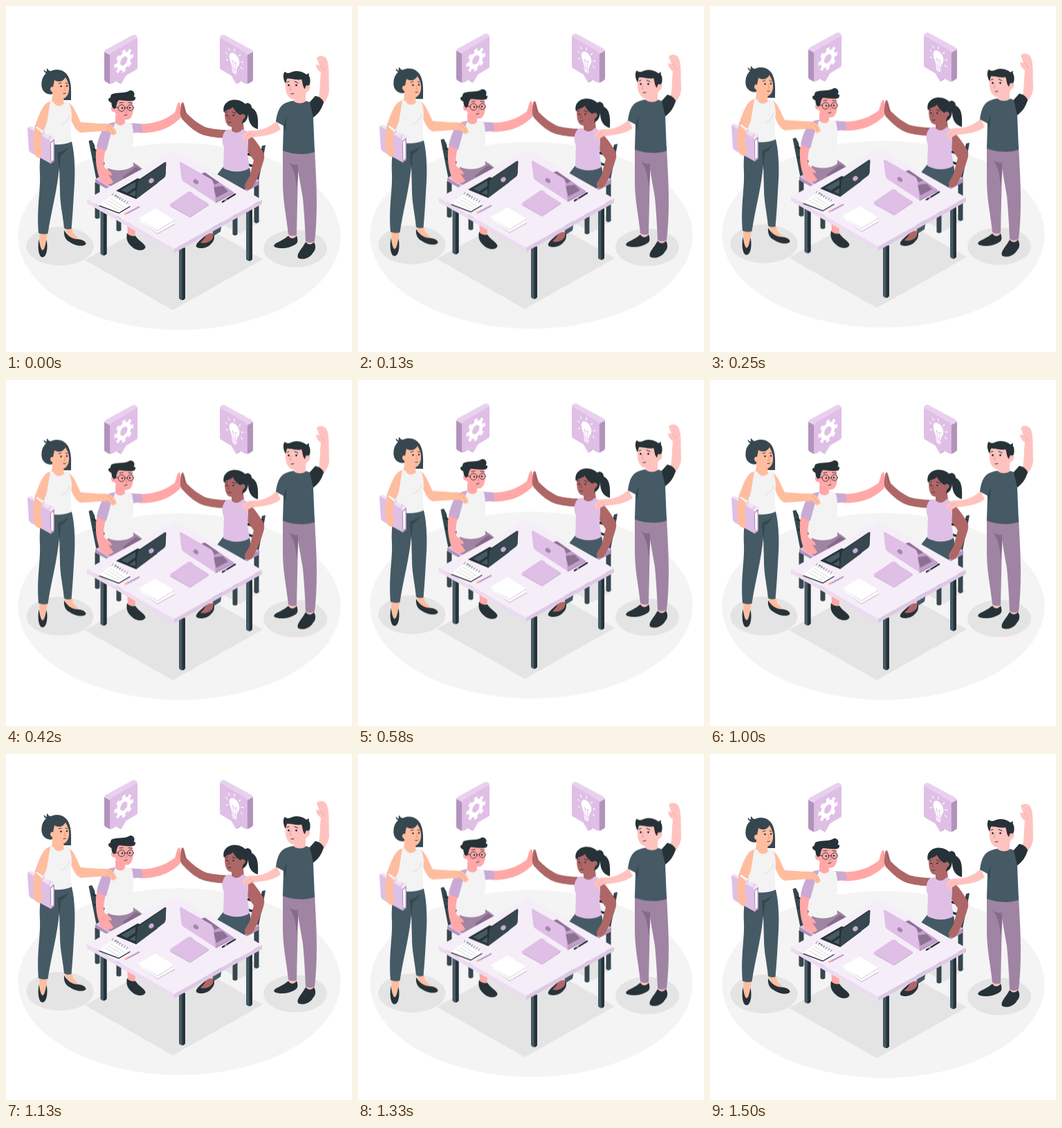
An HTML page for the animation above (1540 ms loop, 500 by 500 pixels).

```html
<!DOCTYPE html>
<html lang="en">
<head>
<meta charset="utf-8">
<title>Team high five</title>
<style>
  html, body { margin: 0; width: 100%; height: 100%; overflow: hidden; background: #fff; }
  svg { display: block; width: 100%; height: 100%; }
  .scene { animation: float 1540ms linear infinite; }
  @keyframes float {
    0%, 97.4%, 100% { transform: translateY(0); }
    46.75% { transform: translateY(-9.6px); }
    95.45% { transform: translateY(.4px); }
  }
  .ink { fill: #263238; }
  .slate { fill: #37474f; }
  .denim { fill: #455a64; }
  .lilac { fill: #dfbfe6; }
  .mauve { fill: #b392bb; }
  .plum { fill: #a084a3; }
  .cloth { fill: #f3f3f3; }
  .peach { fill: #ffbd9f; }
  .rose { fill: #ffa8a7; }
  .blush { fill: #ffc3bf; }
  .brown { fill: #ae6766; }
  .white { fill: #fff; }
  .shade { fill: #e4e4e4; }
  .line { fill: none; stroke: #263238; stroke-linecap: round; stroke-linejoin: round; }
  .pale { fill: none; stroke: #fff; stroke-linecap: round; }
</style>
</head>
<body>
<svg viewBox="0 0 500 500">
<defs>
  <g id="bubble">
    <path fill="#e8d0ee" d="M142 67Q142 64.500 144.500 63L183 42Q185 41 187 42.200L188.500 43Q190 44 190 46V89L151 112L143.500 109Q142 108 142 106Z"/>
    <path class="mauve" d="M142 66.500L150.500 71V112.500Q149 112.500 148 111.800L143.500 109Q142 108 142 106ZM158 105L162 110.300L166.500 112.500V104Z"/>
    <path class="lilac" d="M150.500 71.500Q150.500 69 153 67.500L187 47.500Q190 46 190 48.500V89Q190 91 188 92L173.500 100.500L166.500 112.500L161 108L153.500 112Q150.500 113.500 150.500 110.500Z"/>
  </g>
  <g id="leg">
    <path class="denim" d="M0 0H9V73Q4.500 78 0 73Z"/>
    <path class="ink" d="M4.500 0H9V73Q7 75.500 4.500 75.500Z"/>
  </g>
</defs>
<g class="scene">
  <!-- floor -->
  <ellipse cx="250.500" cy="333" rx="233" ry="135" fill="#f4f4f4"/>
  <g class="shade">
    <path d="M241 439.500L114 367L245 295L371 366Z"/>
    <path d="M338 329L302 309L334 291L369 311Z"/>
    <ellipse cx="78" cy="347" rx="48.500" ry="28"/>
    <ellipse cx="418" cy="350.500" rx="46" ry="27"/>
  </g>

  <!-- bubbles -->
  <use href="#bubble"/>
  <g class="pale" transform="matrix(.866 -.5 0 1 170.300 79.500)" style="stroke-linecap:butt">
    <circle r="9" stroke-width="6"/>
    <circle r="13.300" stroke-width="5" pathLength="16" stroke-dasharray="1 1" stroke-dashoffset=".5"/>
  </g>
  <use href="#bubble" transform="matrix(-1 0 0 1 499 0)"/>
  <g transform="matrix(.866 .5 0 1 330 79)">
    <path class="white" d="M-4 12C-4 6-8.500 4-8.500-2A8.500 8.500 0 0 1 8.500-2C8.500 4 4 6 4 12Z"/>
    <path class="pale" stroke-width="2" d="M-3.500 14.500H3.500M-2.500 17.500H2.500"/>
    <path class="pale" stroke-width="1.400" d="M0-13.500V-17M-8-11L-10-13.500M8-11L10-13.500M-11.500-4L-14.500-5M11.500-4L14.500-5M-11 4L-13.500 5.500M11 4L13.500 5.500"/>
    <path fill="none" stroke="#dfbfe6" stroke-width=".9" d="M-1.500 11L-3 1L0 3.500L3 1L1.500 11"/>
  </g>

  <!-- left chair -->
  <path class="slate" d="M119.500 195L124 193.500L128 201L137 252L131 253ZM128.500 255H135.500V306Q132 309 128.500 306ZM159.500 300H166.500V324Q163 327 159.500 324Z"/>
  <path class="line" stroke-width="3" d="M126 207L140 214M128 222L142 228"/>
  <path class="lilac" d="M129 250L160 234L202 256L168 276Z"/>
  <path class="mauve" d="M129 250L168 273V277L129 255Z"/>

  <!-- seated man -->
  <path class="rose" d="M175 310L176 329L186 336L188 315Z"/>
  <path class="ink" d="M175 328C179 333 184 333 187 332C191 339 202 344 201.500 349C199 355 188 354 182 348C176 343 173 337 175 328Z"/>
  <path class="plum" d="M147 231L184 226C192 231 199 236 203 243L168 268L147 258Z"/>
  <path fill="#876b8a" d="M169 247L188 232L195 236L172 255Z"/>
  <path class="rose" d="M192 170.500C212 171 230 165 244 154C246 148 247 141 250 139C252 139 252 142 252 145C255 148 254 157 252 162C238 176 220 184 192 183.500Z"/>
  <path fill="none" stroke="#e98e90" stroke-width=".7" d="M247 155L252 144"/>
  <path fill="#c9aad4" d="M176 169L195 170Q198 177 197 182L180 184Z"/>
  <path class="cloth" d="M156 168C164 166 174 167 182 170Q186 188 183 203L184 231C171 241 151 238 142 231L147 190Z"/>
  <path class="rose" d="M158 157L172 160L172 169Q166 176 158 169Z"/>
  <path fill="#c9aad4" d="M158 168C144 168 137 178 131 203Q137 211 145 209L151 187Z"/>
  <path class="rose" d="M131 204L144 209C141 218 141 226 142 233C148 238 153 240 153 245L148 244L155 254C152 260 143 258 137 253C131 240 128 222 131 204Z"/>
  <path class="rose" d="M156 137C164 131 179 133 183 138C185 149 184 161 177 164C168 166 160 160 157 153Q152 154 152 148Q152 144 156 145Z"/>
  <path class="ink" d="M156 149C154 146 152 144 152.500 140C148 138 147 135 149 133C152 134 150 128 154 127C162 124 172 127 179 122C185 121 187 127 184.500 131Q189 131 186 136C180 139 170 136 163 136C160 139 160 143 159 147Z"/>
  <g class="line" stroke-width=".9">
    <circle cx="167" cy="147.500" r="4.800"/><circle cx="179.800" cy="147" r="4.300"/>
    <path d="M162.200 147L154 146M171.800 147H175.500M164 140L169 139.500M177 139.500L182 140.500M171 158Q173 158 175 157"/>
  </g>
  <circle class="ink" cx="168" cy="147.500" r="1.300"/><circle class="ink" cx="179" cy="147" r="1.300"/>
  <path fill="none" stroke="#e57f80" d="M173 147L175 153L172.500 154"/>

  <!-- right chair -->
  <path class="slate" d="M370 202L375 201L374 207L364 257L358 259ZM358.500 254H365.500V312Q362 316 358.500 312ZM327.500 300H334.500V330Q331 333 327.500 330Z"/>
  <path class="line" stroke="#37474f" stroke-width="3.500" d="M350 214Q363 219 370 208M350 229Q361 235 367 224"/>
  <path class="lilac" d="M296 255L336 236L366 252L331 273Z"/>
  <path class="mauve" d="M331 271L366 252V258L331 277Z"/>

  <!-- seated woman -->
  <path class="denim" d="M298 308H313L310 326L299 333Z"/>
  <path class="ink" d="M289 331C284 336 273 343 275 348C280 352 292 350 297 343C301 339 302 334 300 329Z"/>
  <path class="brown" d="M289 329L300 328L299 335C296 341 288 344 281 342C285 338 289 334 289 329Z"/>
  <path class="denim" d="M315 231L352 234C356 246 349 264 340 270L301 249Z"/>
  <path class="brown" d="M320 179C307 179 295 177 288 175C276 169 268 162 261 155C258 147 258 140 255 139C252 141 253 147 252 151C251 157 253 163 256 165C265 175 276 184 287 187C300 190 312 191 322 191Z"/>
  <path fill="none" stroke="#8c4d50" stroke-width=".7" d="M259 156L256 145"/>
  <path class="ink" d="M345 142C350 138 355 142 355 147C363 151 365 160 364 178C356 176 350 169 350 157Z"/>
  <path class="brown" d="M326 166L342 161L344 180Q335 188 326 181Z"/>
  <path class="brown" d="M341 179C353 183 361 194 371 210C375 216 373 222 370 231C365 245 360 258 354 264C348 267 344 263 345 258L352 246L358 223L347 207Z"/>
  <path class="lilac" d="M318 179L324 178Q333 188 342 178L348 181C352 195 349 207 349 215L352 234C341 242 323 240 314 234L315 204C311 195 312 186 318 179Z"/>
  <path class="brown" d="M317 145C324 138 337 139 342 147C347 151 345 160 340 162C337 171 331 177 323 174C316 171 315 157 317 145Z"/>
  <path class="ink" d="M315 154C312 143 320 135.500 331 135.500C343 136 351 144 350 154C350 162 347 168 341 170C343 163 343 158 339 158C334 155 330 151 328 146C324 150 319 149 315 154Z"/>
  <path class="brown" d="M339 157Q345 154 346 160Q343 166 338 165Z"/>
  <g class="ink"><circle cx="319.500" cy="158" r="1.200"/><circle cx="328.500" cy="158" r="1.200"/></g>
  <path class="line" stroke-width=".9" d="M317 154L320 153M327 153L332 155M321 168Q323 169 325 168"/>
  <path fill="none" stroke="#8c4d50" d="M323 158L321 163H324"/>

  <!-- table -->
  <use href="#leg" x="136.500" y="285"/>
  <use href="#leg" x="347" y="293"/>
  <use href="#leg" x="250" y="349.500"/>
  <path fill="#f5eef8" d="M245 209L370 280L243 351L117 279Z"/>
  <path fill="#ecdcf1" d="M117 279L243 351V357L117 285Z"/>
  <path fill="#dfc8e6" d="M243 351L370 280V286L243 357Z"/>

  <!-- dark laptop -->
  <path class="ink" d="M159 267L190 249L219 256L188 279Z"/>
  <path fill="#455a64" d="M166 266L187 254V262L175 270ZM178 272L187 266V275Z"/>
  <path class="ink" d="M187 277L189 255Q189 253 191 251.500L229 226Q231.500 224.500 231.500 227L230.500 244Q230 247 228 248.500L188 279Z"/>
  <path class="slate" d="M190 254L231 226L230.500 244Q230 247 228 248.500L188 278.500Z"/>
  <ellipse cx="210" cy="252.500" rx="4" ry="3.200" fill="#cdaad6" transform="rotate(-40 210 252.500)"/>

  <!-- lilac laptop -->
  <path fill="#c49ecd" d="M280 243L287 240L329 269L303 283Z"/>
  <path fill="#8d7193" d="M283 242L288 241L308 255L302 258ZM300 262L313 260L321 268L304 277Z"/>
  <path class="mauve" d="M302 283L329 269V271L303 285Z"/>
  <path class="lilac" d="M251 227Q251 224.500 253 225.500L296 250Q299 252 299.500 255L303 284L257 254Q254 252 253.500 249Z"/>
  <ellipse cx="274.500" cy="254" rx="4.200" ry="3" fill="#a488aa" transform="rotate(38 274.500 254)"/>

  <!-- papers -->
  <path class="mauve" d="M236 289L266 306L293 288V286Z" opacity=".6"/>
  <path class="lilac" d="M236 287L264 268L269 269L271 272L293 286L266 305Z"/>
  <path fill="#d5c8da" d="M191 309L219 328.500L244 314V316L219 330Z"/>
  <path class="white" d="M193 311L218 297L244 314L219 328Z"/>
  <path fill="#ddd3e1" d="M191 307L219 324L243 309V310.500L219 325.500Z"/>
  <path class="white" d="M191 307L216 292.500L243 309L219 324Z"/>
  <path class="ink" d="M134 289L158 273L180 290L163 300Z"/>
  <path class="white" d="M134 287.500L155 272L180 288.500L163 298.500Z"/>
  <path class="line" stroke-width=".6" d="M153 274l2-3m1.500 5l2-3m1.500 5l2-3m1.500 5l2-3m1.500 5l2-3m1.500 5l2-3m1.500 5l2-3"/>
  <path class="line" stroke-width=".6" style="stroke:#bbb" d="M151 278L171 291M147 281L167 293M143 284L163 295.500"/>
  <path fill="none" stroke="#c39acb" stroke-width="2.500" d="M174 300L193 290"/>
  <path fill="none" stroke="#ffa8a7" stroke-width="2.500" d="M171.500 301L176 298.500"/>
  <path class="line" stroke-width="2.500" d="M313 283L331 272"/>
  <path fill="none" stroke="#b392bb" stroke-width="2.500" d="M316 281L319 279"/>

  <!-- standing woman -->
  <path class="peach" d="M48 324H60L57 354H49ZM83 316H94L97 328L107 339L90 335Z"/>
  <path class="ink" d="M47.500 337C49 344 50 352 53 353C56 352 57 344 58.500 338C61 348 59 363 53 363C47 363 45.500 349 47.500 337ZM84 324C88 331 95 337 104 337C109 337 116 340 115.500 344C111 349 99 346 92 341C87 339 83 333 84 324Z"/>
  <path class="denim" d="M53 196H95C100 216 100 245 98.500 263C97 290 96 307 94.500 322Q88 324 84 321C82 301 78 286 78 268L77 231C75 263 65 298 60.500 329Q53 331 47 328C44 293 50 268 49 243C48 225 50 209 53 196Z"/>
  <path class="slate" d="M75 212Q83 210 90 204Q86 212 79 216L77 242Z"/>
  <path class="slate" d="M58 97C55 96 54 93 55 92Q57 95 59 95Q58 91 60 90Q61 94 65 94C76 89 87 94 91 104C95 114 94 125 94 136L78 136L68 127C58 130 50 122 51.500 111C52 104 55 100 58 97Z"/>
  <path class="peach" d="M67 124L84 130L83 139L92 143L80 152L62 142Q68 138 67 124Z"/>
  <path class="peach" d="M86 138C97 140 101 154 108 168L138 170C148 169 157 172 160 184L155 187L147 181L137 181L108 183C101 181 96 170 92 159Z"/>
  <path fill="none" stroke="#ec9c80" stroke-width=".7" d="M145 173Q153 174 155 184M145 178L151 183"/>
  <path class="cloth" d="M63 138L68 138Q75 151 87 138L91 139Q95 148 95 160Q92 174 95 196C82 202 65 201 53 197L57 164Z"/>
  <path fill="none" stroke="#ddd" d="M92 158Q89 169 80 172"/>
  <path class="peach" d="M64 138C53 140 48 157 42 173C37 188 41 203 43 215L53 211L51 189L59 169Z"/>
  <path class="mauve" d="M64 196L70 192V224L65 228Z"/>
  <path class="white" d="M36 176L44 174L69 191L64 197ZM65 198L68.500 195V222L65.500 225Z"/>
  <path class="line" stroke-width="1" style="stroke:#8d7193" d="M43 174L42 179M55 182L53 186M64 188L62 193"/>
  <path class="lilac" d="M31 176Q32 174 34 176L62 193Q64 194 64 197L65 228L36 212Q33 210 33 208Z"/>
  <path fill="#ebd5ef" d="M31 176L35 173L70 190L64 195Z" opacity=".7"/>
  <path class="peach" d="M42 174L52 184L50 202Q54 208 52 214Q50 222 46 219Q40 216 40 208Q38 190 42 174Z"/>
  <path class="peach" d="M70 107C76 111 83 109 86 103Q89 108 90.500 113C92 121 91 129 85 133C77 134 72 130 69 125C62 124 63 115 68 117Z"/>
  <g class="ink"><circle cx="79.500" cy="116" r="1.300"/><circle cx="88" cy="115.500" r="1.300"/></g>
  <path class="line" stroke-width=".9" d="M76 112L80 111M86 111L89 112M83 126.500Q85 127 86.500 126"/>
  <path fill="none" stroke="#ee957a" d="M84 116L86 122L83 122"/>

  <!-- standing man -->
  <path class="blush" d="M409 324H420V337L408 338ZM434 334H446L445 347L433 348Z"/>
  <path class="ink" d="M408 332C412 338 417 336 420 332C422 337 422 342 419 344C411 350 396 352 388 348C384 343 398 341 408 332ZM433 341C437 346 442 345 445 341C448 346 448 352 444 356C440 364 429 368 422 364C419 358 428 351 433 341Z"/>
  <path class="plum" d="M400 204H446C447 230 449 255 449 283C449 304 448 323 446 340Q439 344 433 340C432 316 431 300 429 278L422 238L420 331Q413 334 408 330C405 302 400 282 400 255Z"/>
  <path fill="#876b8a" d="M409 226Q416 231 422 229L422 245L420 265Q419 239 409 226Z"/>
  <path class="blush" d="M391 166C382 175 371 179 360 180C350 179 343 182 341 190L346 195L355 190C370 188 386 187 397 178Z"/>
  <path fill="none" stroke="#eda09d" stroke-width=".7" d="M355 184Q347 185 346 193M358 187L351 191"/>
  <path class="blush" d="M449 144C455 127 453 110 455 96C449 92 447 86 449 84L453 86L449 75C452 71 459 71 463 76C468 86 466 102 467 121C467 131 461 139 455 146Z"/>
  <path fill="none" stroke="#eda09d" stroke-width=".7" d="M453 86Q458 87 460 94"/>
  <path class="denim" d="M407 139C416 136 429 135 439 139L447 130Q456 132 459 139C456 149 451 156 444 161L446 211C432 216 411 214 400 209L401 173L390 167C392 152 396 142 407 139Z"/>
  <path class="slate" d="M401 173L406 160L404 182Z"/>
  <path class="ink" d="M439 139L447 130Q456 132 459 139C456 149 451 156 444 161Z"/>
  <path class="blush" d="M417 126L433 123L433 138Q425 143 416 138Z"/>
  <path class="blush" d="M404 106C412 100 430 101 435 110C441 112 441 122 435 124C432 131 424 137 415 135C404 132 403 119 404 106Z"/>
  <path fill="none" stroke="#eda09d" d="M433 119Q435 115 437 116"/>
  <path class="ink" d="M404 112C400 106 400 97 403 95C406 98 410 97 414 95C422 92 431 96 434 99L438 97Q437 101 439 103C440 108 440 114 437 115Q433 113 432 120C428 116 429 110 427 106C419 108 411 104 406 105Z"/>
  <g class="ink"><circle cx="408.500" cy="114.500" r="1.400"/><circle cx="419.500" cy="114.500" r="1.400"/></g>
  <path class="line" stroke-width="1" d="M406 110L409 109M417 109L422 111M412 127Q414 127.500 416 126.500"/>
  <path fill="none" stroke="#ec9896" d="M412 115L410 121H413"/>
</g>
</svg>
</body>
</html>
```
